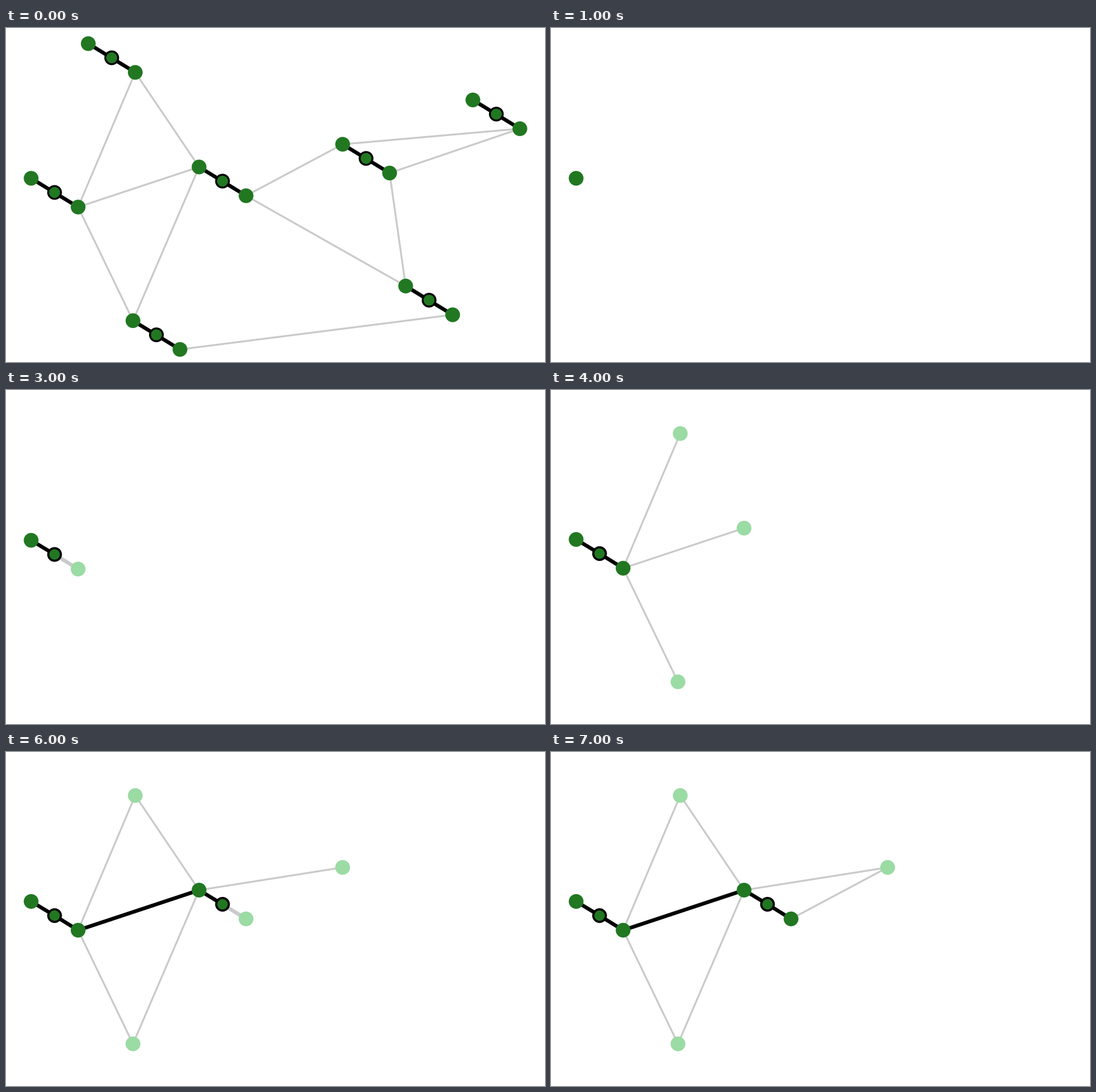
Recreate the animation shown at these times as a matplotlib script. Size 950 by 590 pixels, loop 8 s.

```python
import matplotlib.pyplot as plt
from matplotlib.animation import FuncAnimation
from matplotlib.patches import Circle

W, H, DPI = 950, 590, 100
PX = 72 / DPI
GREEN, LIGHT = "#217821", "#9bdba4"
BLACK, GREY = "#000000", "#cacaca"
RADIUS, THIN, THICK = 13, 3.3, 6.6

# Each unit is a start node, a ringed middle and an end node.
STARTS = {
    "A": (44.3, 265.5), "B": (145, 27.6), "C": (340.3, 245.5),
    "D": (223.8, 517), "E": (593.3, 205.4), "F": (822.9, 127.1),
    "G": (704.4, 455.8),
}
PARTS = {"0": (0, 0), "m": (41.3, 25), "1": (82.8, 50.8)}

FULL_EDGES = "B1A1 B1C0 A1C0 A1D0 C0D0 C1E0 C1G0 E0F1 E1F1 E1G0 D1G1"
FAN = "A1B1 A1C0 A1D0"
NEAR = "A1B1 A1D0 C0B1 C0D0 C0E0"
HEAD = "A0Am AmA1 A1C0"


def scene(reached="", seen="", path="", ahead="", thin="", lift=0.0, ring=3.8):
    return dict(reached=reached, seen=seen, path=path, ahead=ahead,
                thin=thin, lift=lift, ring=ring)


LIFT = 1.5
SCENES = [
    scene(reached=" ".join(u + p for u in STARTS for p in PARTS),
          path=" ".join(f"{u}0{u}1" for u in STARTS),
          thin=FULL_EDGES, ring=3.4),
    scene("A0"),
    scene("A0", "Am", ahead="A0Am"),
    scene("A0 Am", "A1", "A0Am", "AmA1"),
    scene("A0 Am A1", "B1 C0 D0", "A0Am AmA1", thin=FAN, lift=LIFT),
    scene("A0 Am A1 C0", "B1 D0 E0 Cm", HEAD, "C0Cm", NEAR, LIFT),
    scene("A0 Am A1 C0 Cm", "B1 D0 E0 C1", HEAD + " C0Cm", "CmC1",
          NEAR, LIFT),
    scene("A0 Am A1 C0 Cm C1", "B1 D0 E0", HEAD + " C0Cm CmC1",
          thin=NEAR + " C1E0", lift=LIFT),
]

fig = plt.figure(figsize=(W / DPI, H / DPI), dpi=DPI, facecolor="white")
ax = fig.add_axes([0, 0, 1, 1])


def spot(name, lift):
    (x, y), (dx, dy) = STARTS[name[0]], PARTS[name[1]]
    return x + dx, y + dy - lift


def draw_edges(names, color, width, lift, z):
    for name in names.split():
        xs, ys = zip(spot(name[:2], lift), spot(name[2:], lift))
        ax.plot(xs, ys, color=color, lw=width * PX,
                solid_capstyle="butt", zorder=z)


def draw_nodes(names, fill, rim, lift, ring):
    for name in names.split():
        center = spot(name, lift)
        if name[1] == "m":
            node = Circle(center, RADIUS - ring / 2, fc=fill, ec=rim,
                          lw=ring * PX, zorder=4)
        else:
            node = Circle(center, RADIUS, fc=fill, lw=0, zorder=4)
        ax.add_patch(node)


def draw(i):
    ax.clear()
    ax.set_xlim(0, W)
    ax.set_ylim(H, 0)
    ax.axis("off")
    s = SCENES[i]
    lift, ring = s["lift"], s["ring"]
    draw_edges(s["thin"], GREY, THIN, lift, 1)
    draw_edges(s["ahead"], GREY, THICK, lift, 2)
    draw_edges(s["path"], BLACK, THICK, lift, 3)
    draw_nodes(s["seen"], LIGHT, GREY, lift, ring)
    draw_nodes(s["reached"], GREEN, BLACK, lift, ring)
    return []


anim = FuncAnimation(fig, draw, frames=len(SCENES), interval=1000,
                     init_func=lambda: [], repeat=True, repeat_delay=0)
plt.show()
```
